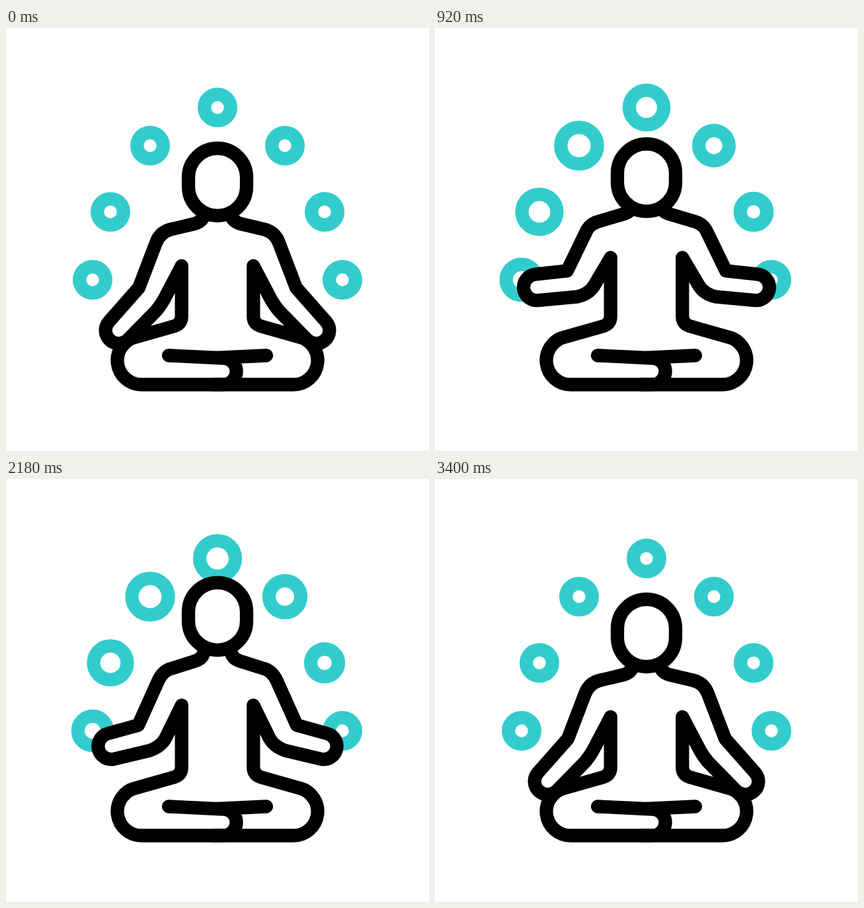
These frames come from a looping animation (640 px wide and 640 px high, 3600 ms). An HTML page:

```html
<!DOCTYPE html>
<html lang="en">
<head>
<meta charset="utf-8">
<title>Meditation</title>
<style>
  html, body { margin: 0; width: 100%; height: 100%; overflow: hidden; background: #fff; }
  svg { display: block; width: 100%; height: 100%; }
</style>
</head>
<body>
<svg viewBox="0 0 640 640" fill="#fff" stroke="#000" stroke-width="20.3" stroke-linecap="round" stroke-linejoin="round">
  <g id="rings" fill="none" stroke="#33cccc"></g>
  <path id="half"/>
  <use href="#half" transform="matrix(-1 0 0 1 640 0)"/>
  <path fill="none" d="M246 495.5L329 499.5A19.6 20 0 0 1 329 539.5H312M394 495.5L320 499"/>
  <rect id="head" x="276" y="182" width="88" height="102" rx="44"/>
</svg>
<script>
const LOOP = 3600;
const HAND_R = 19.8;
const SPOTS = [[131, 381], [158, 278.2], [218, 178], [320, 120.3], [422, 178], [482, 278.2], [509, 381]];

const ARM = [[0, 0], [1150, 1], [1700, 1], [2830, 0]];
const TORSO = [[0, 0], [1600, 1], [1800, 1], [3400, 0]];
const HEAD = [[0, 0], [500, 7.5], [1600, -35.5], [1800, -35.5], [2990, 7.5], [3400, 0]];

const half = document.getElementById('half');
const head = document.getElementById('head');
const rings = SPOTS.map(([x, y]) => {
  const c = document.createElementNS('http://www.w3.org/2000/svg', 'circle');
  c.setAttribute('cx', x);
  c.setAttribute('cy', y);
  return document.getElementById('rings').appendChild(c);
});

// Eased value of a list of [time, value] keys.
function track(keys, t) {
  for (let i = 1; i < keys.length; i++) {
    const [t0, a] = keys[i - 1], [t1, b] = keys[i];
    if (t < t1) {
      const u = (t - t0) / (t1 - t0);
      return a + (b - a) * u * u * (3 - 2 * u);
    }
  }
  return keys[keys.length - 1][1];
}

const mix = (a, b, k) => [a[0] + (b[0] - a[0]) * k, a[1] + (b[1] - a[1]) * k];
const fmt = p => p[0].toFixed(2) + ' ' + p[1].toFixed(2);

// Angle at which the line from p touches the hand circle.
function touch(p, hand, side) {
  const dx = p[0] - hand[0], dy = p[1] - hand[1];
  return Math.atan2(dy, dx) + side * Math.acos(HAND_R / Math.hypot(dx, dy));
}

function bodyPath(arm, torso) {
  const bend = arm * Math.sqrt(torso);
  const lift = (arm + torso) / 2;
  const neck = (x, y) => fmt([x, y - 24 * torso]);

  // The torso carries the hand up 20 units; the arm swing does the rest.
  const hand = mix([170.5, 457.5], [152, 398.5], arm);
  hand[1] -= 20 * torso;
  const elbow = mix([201, 393], [199.5, 356.5], bend);
  const under = mix([227, 428], [210, 397.5], bend);
  const a = touch(elbow, hand, -1), b = touch(under, hand, 1);
  const rim = q => fmt([hand[0] + HAND_R * Math.cos(q), hand[1] + HAND_R * Math.sin(q)]);
  const turn = (a - b + 4 * Math.PI) % (2 * Math.PI);

  return `M${neck(300, 272)}L${neck(300, 279)}Q${neck(299, 292)} ${neck(286, 296)}` +
    `L${fmt(mix([250, 304.5], [250, 284], torso))}` +
    `Q${fmt(mix([233, 308.5], [238, 287], torso))} ${fmt(mix([227, 325], [231, 299], lift))}` +
    `L${fmt(elbow)}L${rim(a)}` +
    `A${HAND_R} ${HAND_R} 0 ${turn > Math.PI ? 1 : 0} 0 ${rim(b)}` +
    `L${fmt(under)}` +
    `Q${fmt(mix([236, 417], [233, 396], bend))} ${fmt(mix([241, 407], [242, 380], bend))}` +
    `L${fmt(mix([265.7, 360], [265.7, 339.5], torso))}` +
    `V436Q265.7 447.5 254 451.3L195.9 467.65A36.5 36.5 0 0 0 205 539.5H322`;
}

function draw(t) {
  rings.forEach((c, i) => {
    const x = Math.min(2400, Math.max(0, t - i * 1000 / 6));
    const pulse = (1 - Math.cos(Math.PI * x / 600)) / 2;
    c.setAttribute('r', 19.85 + 7.85 * pulse);
  });
  half.setAttribute('d', bodyPath(track(ARM, t), track(TORSO, t)));
  head.setAttribute('y', 182 + track(HEAD, t));
}

const start = performance.now();
function tick(now) {
  draw(Math.max(0, now - start) % LOOP);
  requestAnimationFrame(tick);
}
draw(0);
requestAnimationFrame(tick);
</script>
</body>
</html>
```
